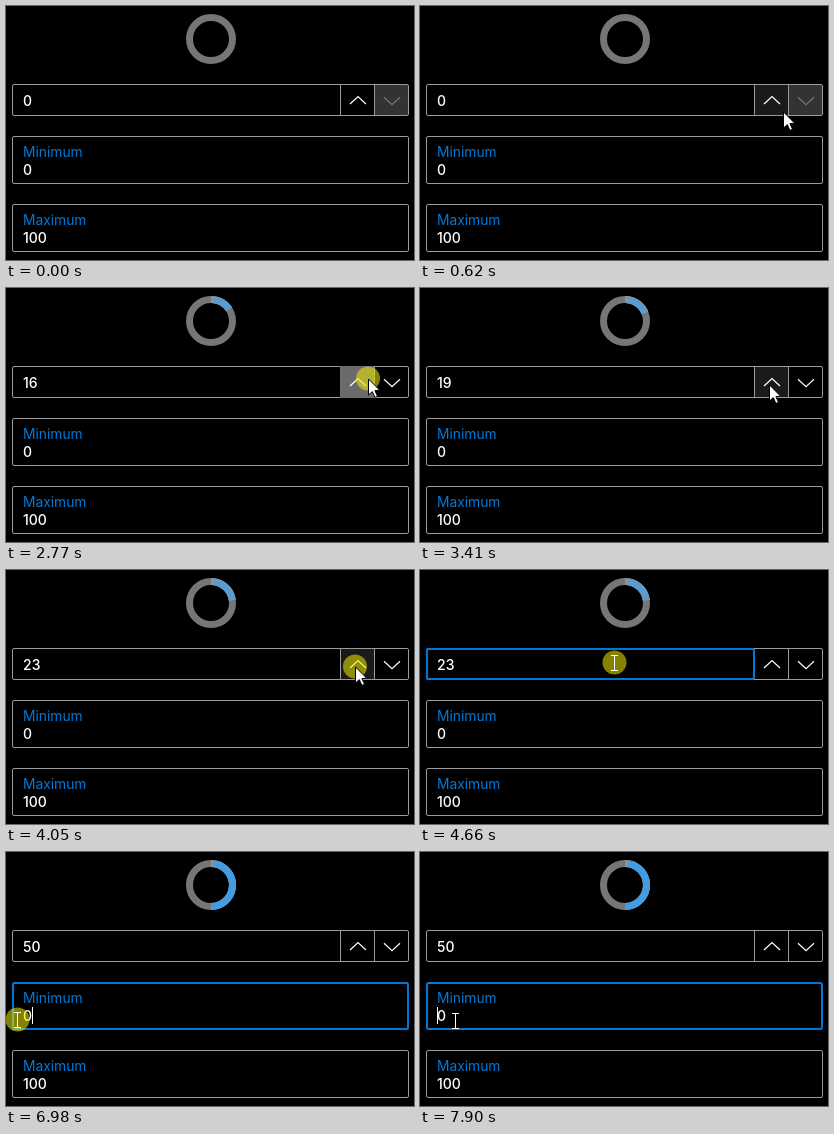
An HTML page with a canvas for the animation above (8 s loop, 408 by 254 pixels).

```html
<!DOCTYPE html>
<html lang="en">
<head>
<meta charset="utf-8">
<title>Number box</title>
<style>
html, body { margin: 0; width: 100%; height: 100%; overflow: hidden; background: #000; }
canvas { display: block; width: 408px; height: 254px; }
</style>
</head>
<body>
<canvas id="stage"></canvas>
<script>
const W = 408, H = 254, LOOP = 8000, LEFT = 17;
const BLUE = '#0078d7', LINE = '#9a9a9a', HOVER = '#c4c4c4';
const canvas = document.getElementById('stage');
const ctx = canvas.getContext('2d');
const scale = window.devicePixelRatio || 1;
canvas.width = W * scale;
canvas.height = H * scale;

// The up button is held first, then clicked at a steady pace.
const hold = { from: 1140, to: 2980, every: 106, count: 18 };
const taps = { from: 3215, every: 205, count: 5 };
const SELECT = 4640, TYPE = 5990, TYPED = 6090, RETURN = 6600, LEAVE = 6900;

const moves = [
  { from: 80, to: 620, x: 363.5, y: 106 },
  { from: 620, to: 900, x: 362.5, y: 91 },
  { from: 3180, to: 3390, x: 349.5, y: 97 },
  { from: 4080, to: 4600, x: 195, y: 93 },
  { from: RETURN, to: LEAVE, x: 12, y: 168 },
  { from: 7040, to: 7240, x: 35.5, y: 169 }
];

const fields = {
  value: { y: 78, h: 32, w: 329 },
  min: { y: 130, h: 48, w: 397 },
  max: { y: 198, h: 48, w: 397 }
};

const during = (t, a, b) => t >= a && t < b;
const clamp = (v, lo, hi) => Math.max(lo, Math.min(hi, v));

const steps = (t, s) => clamp(1 + Math.floor((t - s.from) / s.every), 0, s.count);

function numberAt(t) {
  if (t >= TYPED) return 50;
  if (t >= TYPE) return 5;
  return steps(t, hold) + steps(t, taps);
}

function pointerAt(t) {
  if (t < moves[0].from || during(t, TYPE, RETURN)) return null;
  const p = { x: 405, y: 228 };
  for (const m of moves) {
    const u = clamp((t - m.from) / (m.to - m.from), 0, 1);
    const k = u * u * (3 - 2 * u);
    p.x += (m.x - p.x) * k;
    p.y += (m.y - p.y) * k;
  }
  return p;
}

function clicking(t) {
  const n = steps(t, taps);
  const tapped = n && t - taps.from - (n - 1) * taps.every < 95;
  return tapped || during(t, hold.from, hold.to) ||
    during(t, SELECT, SELECT + 150) || during(t, LEAVE, LEAVE + 140);
}

function fieldUnder(p) {
  if (!p) return '';
  return Object.keys(fields).find(name => {
    const f = fields[name];
    return p.x >= 6 && p.x < 6 + f.w && p.y >= f.y && p.y < f.y + f.h;
  }) || '';
}

function rect(x, y, w, h, color) {
  ctx.fillStyle = color;
  ctx.fillRect(x, y, w, h);
}

function write(s, y, font, color) {
  ctx.font = font + ' Inter, "Open Sans", sans-serif';
  ctx.fillStyle = color;
  ctx.fillText(s, LEFT, y);
  return Math.floor(ctx.measureText(s).width);
}

const label = (s, y) => write(s, y, '13.8px', BLUE);
const digits = (s, y) => write(s, y, '500 14px', '#fff');
const caret = (x, y) => rect(LEFT + x, y, 1, 17, '#fff');

function frame(x, y, w, h, color, width = 1) {
  const d = width / 2;
  ctx.strokeStyle = color;
  ctx.lineWidth = width;
  ctx.beginPath();
  ctx.roundRect(x + d, y + d, w - width, h - width, 1.5);
  ctx.stroke();
}

function chevron(x, y, dir, color) {
  ctx.strokeStyle = color;
  ctx.lineWidth = 1.2;
  ctx.beginPath();
  ctx.moveTo(x - 8, y + 3.7 * dir);
  ctx.lineTo(x, y - 3.7 * dir);
  ctx.lineTo(x + 8, y + 3.7 * dir);
  ctx.stroke();
}

function arc(from, to, color) {
  ctx.strokeStyle = color;
  ctx.lineWidth = 7;
  ctx.beginPath();
  ctx.arc(205, 33, 21.5, from - Math.PI / 2, to - Math.PI / 2);
  ctx.stroke();
}

function ring(n) {
  const end = n / 100 * Math.PI * 2, start = 0.14;
  arc(0, Math.PI * 2, '#767676');
  if (n) arc(0, end, '#919191');
  if (end > start) arc(start, end, n < 50 ? '#5c9bcd' : '#429ce3');
}

function buttons(t, n, p) {
  const over = p && during(p.x, 335, 368) && during(p.y, 79, 109);
  const pressed = during(t, 910, hold.to);
  if (over) rect(335, 79, 33, 30, '#1a1a1a');
  if (!n) rect(369, 79, 33, 30, '#333');
  frame(6, 78, 397, 32, LINE);
  rect(334, 79, 1, 30, LINE);
  rect(368, 79, 1, 30, LINE);
  if (pressed) rect(334, 78, 34, 32, '#6b6b6b');
  chevron(352, 94.3, 1, '#fff');
  chevron(386, 95, -1, n ? '#fff' : '#767676');
}

function arrow({ x, y }) {
  ctx.beginPath();
  ctx.moveTo(x, y);
  ctx.lineTo(x, y + 16);
  ctx.lineTo(x + 3.8, y + 12.6);
  ctx.lineTo(x + 6.4, y + 18.4);
  ctx.lineTo(x + 9, y + 17.2);
  ctx.lineTo(x + 6.4, y + 11.6);
  ctx.lineTo(x + 11.2, y + 11.2);
  ctx.closePath();
  ctx.strokeStyle = '#000';
  ctx.lineWidth = 1;
  ctx.fillStyle = '#fff';
  ctx.fill();
  ctx.stroke();
}

function beam(p) {
  const x = Math.round(p.x) - 1, y = Math.round(p.y) - 8;
  rect(x, y, 1, 16, '#fff');
  for (const dy of [0, 15]) {
    rect(x - 3, y + dy, 3, 1, '#fff');
    rect(x + 1, y + dy, 3, 1, '#fff');
  }
}

function pointer(t, p, overField) {
  if (clicking(t)) {
    ctx.fillStyle = 'rgba(236, 232, 0, 0.56)';
    ctx.beginPath();
    ctx.arc(p.x - 0.5, p.y - 0.5, 12, 0, Math.PI * 2);
    ctx.fill();
  }
  (overField ? beam : arrow)(p);
}

function draw(t) {
  const n = numberAt(t), p = pointerAt(t), over = fieldUnder(p);
  const focus = t >= LEAVE ? 'min' : t >= SELECT ? 'value' : '';

  ctx.setTransform(scale, 0, 0, scale, 0, 0);
  rect(0, 0, W, H, '#000');
  ring(n);
  buttons(t, n, p);

  for (const name in fields) {
    const f = fields[name];
    if (name === focus) frame(6, f.y, f.w, f.h, BLUE, 2);
    else if (name !== 'value' || over === name)
      frame(6, f.y, f.w, f.h, over === name ? HOVER : LINE);
  }

  if (during(t, SELECT + 100, TYPE)) rect(LEFT, 86, 18, 17, BLUE);
  const end = digits(String(n), 100);
  label('Minimum', 151);
  const minEnd = digits('0', 169);
  label('Maximum', 219);
  digits('100', 237);

  if (during(t, TYPE, LEAVE)) caret(end, 86);
  if (during(t, LEAVE, 7670)) caret(minEnd, 155);
  if (t >= 7900) caret(0, 155);
  if (p) pointer(t, p, over);
}

let start;
function tick(now) {
  if (start === undefined) start = now;
  draw((now - start) % LOOP);
  requestAnimationFrame(tick);
}
draw(0);
requestAnimationFrame(tick);
</script>
</body>
</html>
```
